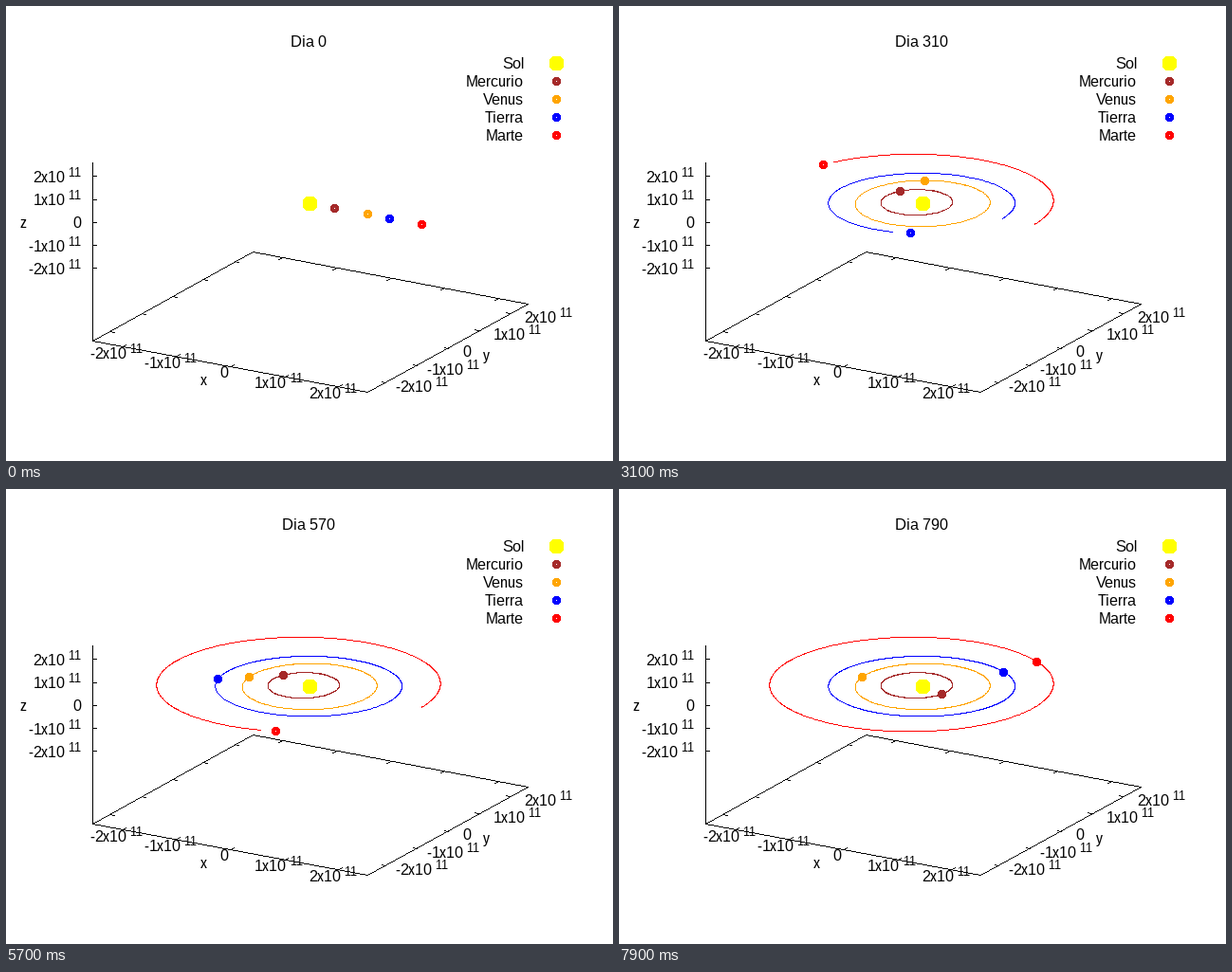
These frames come from a looping animation (640 by 480 pixels, 8000 ms). A matplotlib script:

```python
import numpy as np
import matplotlib.pyplot as plt
from matplotlib.animation import FuncAnimation

W, H, DPI = 640, 480, 100
PX = 72 / DPI                      # one pixel in points
FRAMES, INTERVAL = 80, 100
DAYS_PER_FRAME, LAG = 10.22, 18.6  # simulated days, start-up delay
STEP = DAYS_PER_FRAME / 10

# Screen vectors of 1e11 m along each axis (y pointing down)
X_AXIS = np.array([56.9, 10.63])
Y_AXIS = np.array([32.9, -18.4])
Z_AXIS = np.array([0.0, -24.25])
CENTER = np.array([320.1, 208.9])

# name, colour, semi-major axis (1e11 m), eccentricity, inclination, period (days)
PLANETS = [
    ("Mercurio", "brown", 0.5791, 0.2056, 7.00, 87.97),
    ("Venus", "orange", 1.0821, 0.0068, 3.39, 224.70),
    ("Tierra", "blue", 1.4960, 0.0167, 0.00, 365.26),
    ("Marte", "red", 2.2794, 0.0934, 1.85, 686.98),
]

# Pixel offsets of the two marker shapes
grid = np.stack(np.meshgrid(np.arange(-7, 8), np.arange(-7, 8)), -1).reshape(-1, 2)
dist2 = (grid ** 2).sum(1)
RING = grid[(dist2 > 0) & (dist2 <= 20)]
SUN = grid[np.abs(grid).sum(1) <= 11]

plt.rcParams.update({"font.family": "Liberation Sans",
                     "text.hinting": "default", "text.hinting_factor": 1})
fig = plt.figure(figsize=(W / DPI, H / DPI), dpi=DPI, facecolor="white")
ax = fig.add_axes([0, 0, 1, 1])
ax.set_xlim(0, W)
ax.set_ylim(H, 0)
ax.axis("off")


def to_pixel(points):
    return np.floor(np.asarray(points, float) + 0.5).astype(int)


def raster(points):
    """Pixels of a one-pixel polyline, one per step along the longer side."""
    p = to_pixel(points)
    d = np.diff(p, axis=0)
    n = np.abs(d).max(axis=1)
    seg = np.repeat(np.arange(len(n)), n)
    k = np.arange(n.sum()) - np.repeat(np.cumsum(n) - n, n)
    inner = p[seg] + d[seg] * (k / n[seg])[:, None]
    return np.vstack([to_pixel(inner), p[-1:]])


def pixels(points, color, z=2):
    return ax.plot(*np.transpose(points), ",", color=color, zorder=z)[0]


def text(x, y, s, size=16, ha="left"):
    return ax.text(x, y, s, fontsize=size * PX, ha=ha, va="baseline", color="black")


def line(p, q):
    pixels(raster([p, q]), "black")


def power_label(x, y, n):
    """Label n x 10^11 with its first digit starting at x."""
    if n == 0:
        text(x, y, "0")
        return
    if n < 0:
        text(x, y, "-", ha="right")
    text(x, y, f"{abs(n)}x10")
    text(x + 36.7, y - 6, "11", 12.8)


def orbit(days, a, e, inc, period):
    """Screen position on an orbit that starts at perihelion on the x axis."""
    mean = 2 * np.pi * np.asarray(days, float) / period
    ecc = mean + e * np.sin(mean)
    for _ in range(6):
        ecc -= (ecc - e * np.sin(ecc) - mean) / (1 - e * np.cos(ecc))
    x = a * (np.cos(ecc) - e)
    y = a * np.sqrt(1 - e * e) * np.sin(ecc)
    tilt = np.radians(inc)
    side = Y_AXIS * np.cos(tilt) + Z_AXIS * np.sin(tilt)
    return CENTER + np.multiply.outer(x, X_AXIS) + np.multiply.outer(y, side)


def sim_days(frame):
    return max(0.0, DAYS_PER_FRAME * frame - LAG)


def draw_box():
    left, front, right, back = np.array([[91, 354], [381, 408], [550, 315], [260, 260]])
    for p, q in ((left, front), (front, right), (right, back), (back, left)):
        line(p, q)
    line(left, (91, 166))

    x_tick, y_tick = np.array([4, -2]), np.array([4, 1])
    for n in range(-2, 3):
        for edge, step, tick in (
            ((left + front) / 2, X_AXIS, x_tick),
            ((back + right) / 2, X_AXIS, -x_tick),
            ((left + back) / 2, Y_AXIS, y_tick),
            ((front + right) / 2, Y_AXIS, -y_tick),
        ):
            p = edge + n * step
            line(p, p + tick)
        z = 228.8 - 24.25 * n
        line((91, z), (95, z))

        shift = 4.5 if n == 0 else 25.4 - 2.7 * (n < 0)
        power_label(230.3 + 57.1 * n - shift, 392.5 + 10.5 * n, n)
        power_label(481 + 32.7 * n, 370.5 - 18.3 * n, n)
        power_label(70 if n == 0 else 28.5, 234.5 - 24.25 * n, n)

    text(204.5, 400, "x")
    text(503, 374, "y")
    text(14.5, 234, "z")


draw_box()
title = text(318.6, 43, "", ha="center")

text(546, 66, "Sol", ha="right")
for spot in ((580, 61), (320, 209)):
    pixels(SUN + spot, "yellow", 5)

trails, markers = [], []
for i, (name, color, *_) in enumerate(PLANETS):
    y = 80 + 19 * i
    text(546, y + 5, name, ha="right")
    pixels(RING + (580, y), color, 6)
    trails.append(pixels(np.empty((0, 2)), color, 4 + i * 0.1))
    markers.append(pixels(RING, color, 6 + i * 0.1))


def update(frame):
    title.set_text(f"Dia {10 * frame}")
    now, before = sim_days(frame), sim_days(frame - 1)
    past = np.arange(0, before, STEP)
    for (_, _, *elements), trail, marker in zip(PLANETS, trails, markers):
        marker.set_data(*(RING + to_pixel(orbit(now, *elements))).T)
        path = raster(orbit(past, *elements)) if len(past) > 1 else np.empty((0, 2))
        trail.set_data(*path.T)
    return [title, *trails, *markers]


anim = FuncAnimation(fig, update, frames=FRAMES, interval=INTERVAL,
                     repeat=True, repeat_delay=0, blit=False)
plt.show()
```
